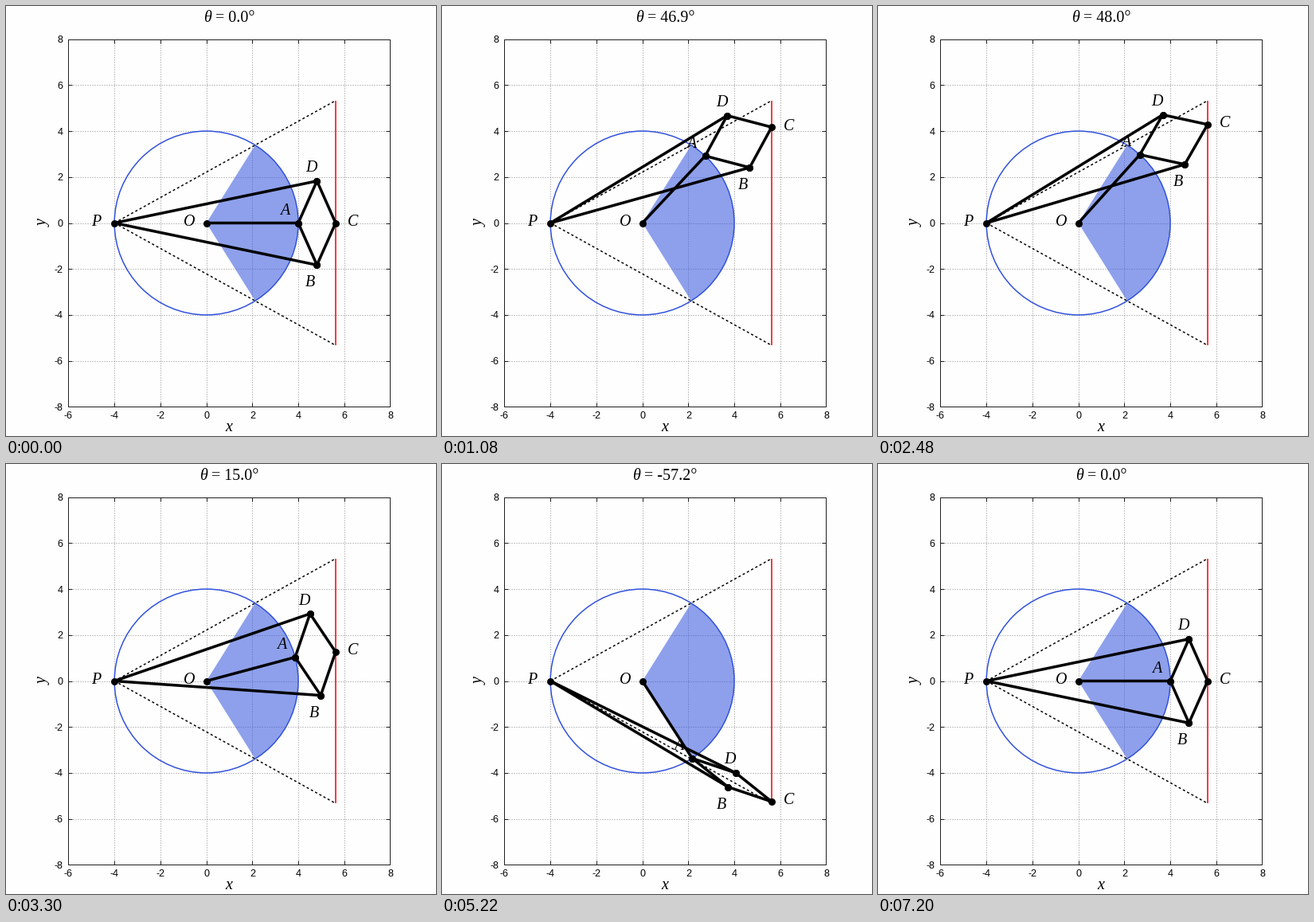
A matplotlib script that plays this animation: 540x540 px, repeating every 7220 ms.

```python
import numpy as np
import matplotlib.pyplot as plt
from matplotlib.animation import FuncAnimation
from matplotlib.patches import Circle, Wedge

SIZE, DPI = 540, 72          # at 72 dpi one point is one pixel
UNIT = 28.86                 # pixels per data unit
OX, OY = 251.6, 272.5        # pixel position of the data origin
FRAMES, INTERVAL = 361, 20

# Peaucellier-Lipkin linkage
R, LONG, SHORT = 4, 9, 2
POWER = LONG**2 - SHORT**2
P, O = np.array([-R, 0.0]), np.zeros(2)
LINE_X = POWER / (2 * R) - R
MAX_HALF = np.arccos((LONG - SHORT) / (2 * R))
MAX_Y = (LONG + SHORT) * np.sin(MAX_HALF)
MAX_DEG = 2 * np.degrees(MAX_HALF)

BLUE = "#2f50dc"


def px(x, y):
    """Pixel position (from the top left) in data units."""
    return (x - OX) / UNIT, (OY - y) / UNIT


fig = plt.figure(figsize=(SIZE / DPI, SIZE / DPI), dpi=DPI, facecolor="#fefefe")
ax = fig.add_axes([0, 0, 1, 1])
ax.axis("off")
left, top = px(0, 0)
right, bottom = px(SIZE, SIZE)
ax.set(xlim=(left, right), ylim=(bottom, top), autoscale_on=False)


def serif(x, y, s, style="italic", **kw):
    kw = {"ha": "center", "va": "baseline"} | kw
    return ax.text(*px(x, y), s, family="Liberation Serif", style=style,
                   size=20, color="black", zorder=6, **kw)


# Grid, border, ticks
xs, ys = np.arange(-6, 9, 2), np.arange(-8, 9, 2)
grid = dict(colors="#8c8c8c", lw=1, linestyles=[(0, (1, 2))], zorder=0)
ax.vlines(xs[1:-1], -8, 8, **grid)
ax.hlines(ys[1:-1], -6, 8, **grid)

edge = dict(colors="#202020", lw=1, zorder=5)
ax.vlines([-6, 8], -8, 8, **edge)
ax.hlines([-8, 8], -6, 8, **edge)
tick = 5 / UNIT
for start in (-8, 8 - tick):
    ax.vlines(xs, start, start + tick, **edge)
for start in (-6, 8 - tick):
    ax.hlines(ys, start, start + tick, **edge)

label = dict(family="Liberation Sans", size=12.5, color="black")
for v in xs:
    ax.text(v, px(0, 517.5)[1], str(v), ha="center", va="baseline", **label)
for v in ys:
    ax.text(px(71.5, 0)[0], v - 4.5 / UNIT, str(v), ha="right", va="baseline", **label)
serif(279.5, 533.5, "x")
serif(47, 273, "y", rotation=90, va="center")

# Fixed geometry
ax.add_patch(Wedge(O, R, -MAX_DEG, MAX_DEG, fc=BLUE, ec="none", alpha=0.54, zorder=1))
ax.add_patch(Circle(O, R, fill=False, ec=BLUE, lw=1.5, zorder=2))
ax.plot([LINE_X] * 2, [-MAX_Y, MAX_Y], color="#ee1018", lw=1.6,
        solid_capstyle="butt", zorder=2)
for side in (1, -1):
    ax.plot([P[0], LINE_X], [0, side * MAX_Y], color="black", lw=1.5,
            ls=(0, (2, 2)), dash_capstyle="butt", zorder=2)

# Moving parts
bar = dict(color="black", lw=3.5, solid_joinstyle="round", solid_capstyle="round",
           marker="o", ms=9, mew=0, zorder=4)
rhombus, = ax.plot([], [], **bar)
arms, = ax.plot([], [], **bar)

serif(113.5, 276, "P")
serif(230.5, 276, "O")
OFFSETS = {"A": (-17.3, -10.5), "B": (-8.3, 27), "C": (21.7, 3.5), "D": (-7, -11.5)}
names = {n: serif(0, 0, n) for n in OFFSETS}
theta_mark = serif(248, 20, "θ", ha="left")
reading = serif(287.5, 20, "", "normal")


def joints(theta):
    half = theta / 2
    along = np.array([np.cos(half), np.sin(half)])
    across = np.array([-along[1], along[0]])
    pa = 2 * R * along[0]
    pc = POWER / pa
    h = np.sqrt(max(0, SHORT**2 - ((pc - pa) / 2) ** 2))
    mid = P + along * (pa + pc) / 2
    return {"A": P + along * pa, "B": mid - across * h,
            "C": P + along * pc, "D": mid + across * h}


def update(i):
    deg = MAX_DEG * np.sin(np.radians(i))
    j = joints(np.radians(deg))
    rhombus.set_data(*np.array([O] + [j[n] for n in "ADCBA"]).T)
    arms.set_data(*np.array([j["D"], P, j["B"]]).T)
    for n, (dx, dy) in OFFSETS.items():
        names[n].set_position(j[n] + np.array([dx, -dy]) / UNIT)

    reading.set_text(f"= {round(deg, 1) + 0.0:.1f}°")
    width = reading.get_window_extent().width
    theta_mark.set_x(px(287.5 - width / 2 - 15, 0)[0])
    return [rhombus, arms, theta_mark, reading, *names.values()]


anim = FuncAnimation(fig, update, frames=FRAMES, interval=INTERVAL,
                     repeat=True, repeat_delay=0)
plt.show()
```
